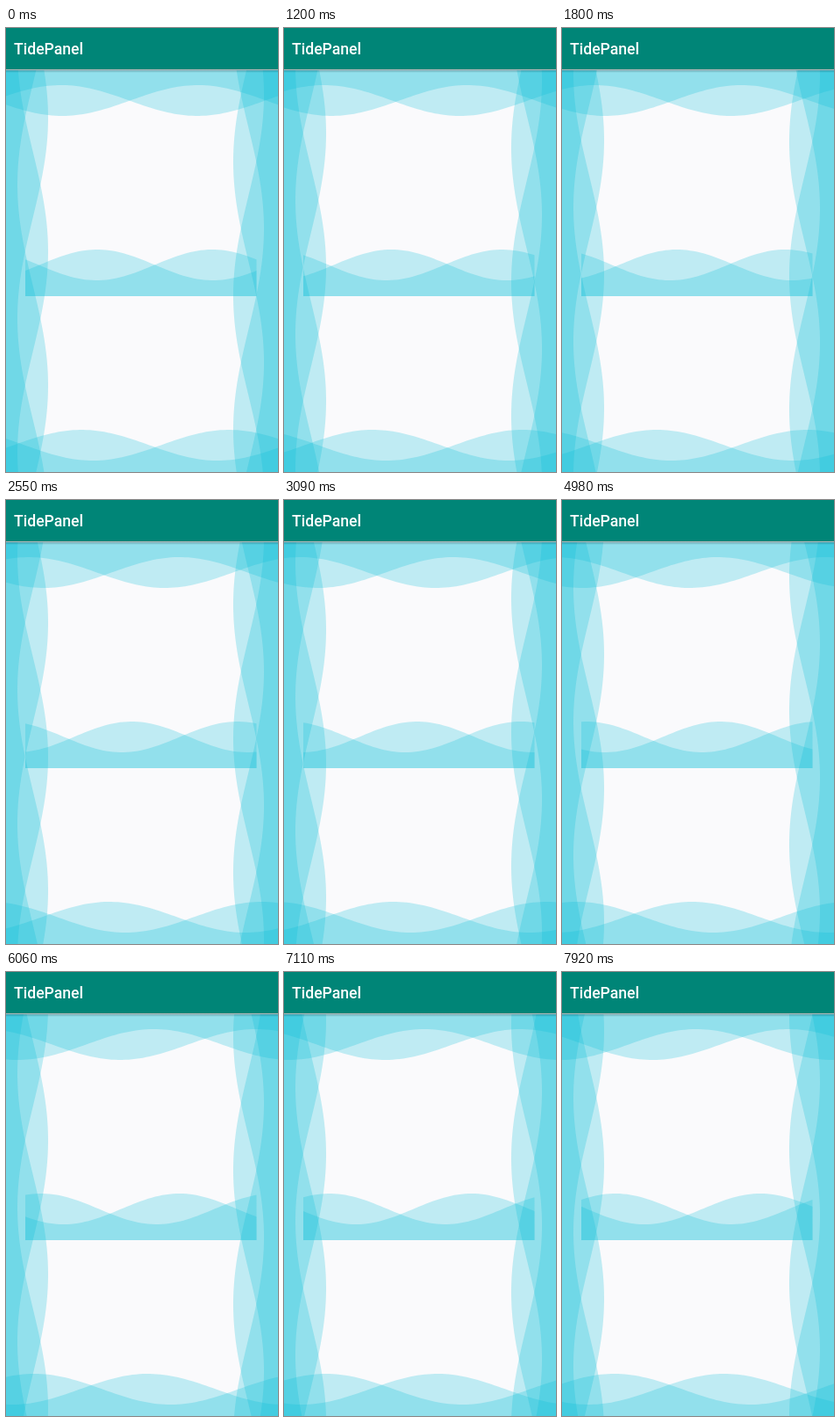
An HTML page that plays this animation: 310 by 505 pixels, repeating every 8000 ms.

```html
<!DOCTYPE html>
<html lang="en">
<head>
<meta charset="utf-8">
<title>Waves</title>
<style>
  html, body { margin: 0; width: 100%; height: 100%; overflow: hidden; background: #fafafc; }
  svg { display: block; width: 310px; height: 505px; }
  #waves path { fill: #00bcd4; fill-opacity: .236; }
  text { font: 500 17.6px Roboto, sans-serif; fill: #fff; }
</style>
</head>
<body>
<svg viewBox="0 0 310 505">
  <defs>
    <linearGradient id="shade" x2="0" y2="1">
      <stop offset="0" stop-color="#000" stop-opacity=".3"/>
      <stop offset="1" stop-color="#000" stop-opacity="0"/>
    </linearGradient>
  </defs>
  <rect width="310" height="505" fill="#fafafc"/>
  <g id="waves"></g>
  <rect y="47" width="310" height="4" fill="url(#shade)"/>
  <rect width="310" height="47" fill="#008577"/>
  <text x="9" y="30">TidePanel</text>
</svg>
<script>
const LOOP = 8000, AMP = 17.5, STEP = 4;

// Each wave is [position of its furthest reach, speed in px per ms].
const thirds = (peak, speed) => [0, 1, 2].map(k => [peak + k * 457 / 3, speed]);
const views = [
  { from: 48, to: 505, base: 0, mid: 30.5, upright: true, waves: thirds(102, .0148) },
  { from: 48, to: 505, base: 310, mid: 276.5, upright: true, waves: thirds(152, -.013) },
  { from: 0, to: 310, base: 48, mid: 82.5, waves: [[218, -.01452], [64, -.0083]] },
  { from: 0, to: 310, base: 505, mid: 474.5, waves: [[86, .0125], [-56, .0146]] },
  { from: 22, to: 285.5, base: 305, mid: 269.5, waves: [[104, .0154], [-28.5, .0113]] }
];

// Moments at which the picture refreshes.
const run = (a, b, n) => Array.from({ length: n }, (_, i) => a + (b - a) * i / (n - 1));
const ticks = [
  0, ...run(90, 630, 6), 900, 1200, 1470, ...run(1740, 2280, 4), 2550,
  ...run(2820, 3090, 3), 3390, 3630, 3930, 4170, 4440, 4710, 4980, 5250,
  ...run(5520, 5790, 3), 6060, ...run(6330, 6570, 3), 6840, 7110, 7380, 7620, 7920
];

const layer = document.getElementById('waves');
const shapes = views.flatMap(view => view.waves.map(([peak, speed]) => {
  const path = document.createElementNS('http://www.w3.org/2000/svg', 'path');
  layer.append(path);
  return { view, peak, speed, path };
}));

function outline({ from, to, base, mid, upright }, peak) {
  const reach = Math.sign(mid - base) * AMP;
  const point = (u, v) => (upright ? [v, u] : [u, v]).map(n => n.toFixed(2)).join(' ');
  const pts = [point(from, base)];
  for (let u = from; ; u = Math.min(u + STEP, to)) {
    pts.push(point(u, mid + reach * Math.cos(2 * Math.PI * (u - peak) / (to - from))));
    if (u >= to) break;
  }
  pts.push(point(to, base));
  return 'M' + pts.join('L') + 'Z';
}

function draw(time) {
  const t = ticks.findLast(tick => tick <= time);
  for (const { view, peak, speed, path } of shapes) {
    path.setAttribute('d', outline(view, peak + speed * t));
  }
}

const start = performance.now();
function frame() {
  draw((performance.now() - start) % LOOP);
  requestAnimationFrame(frame);
}
frame();
</script>
</body>
</html>
```
